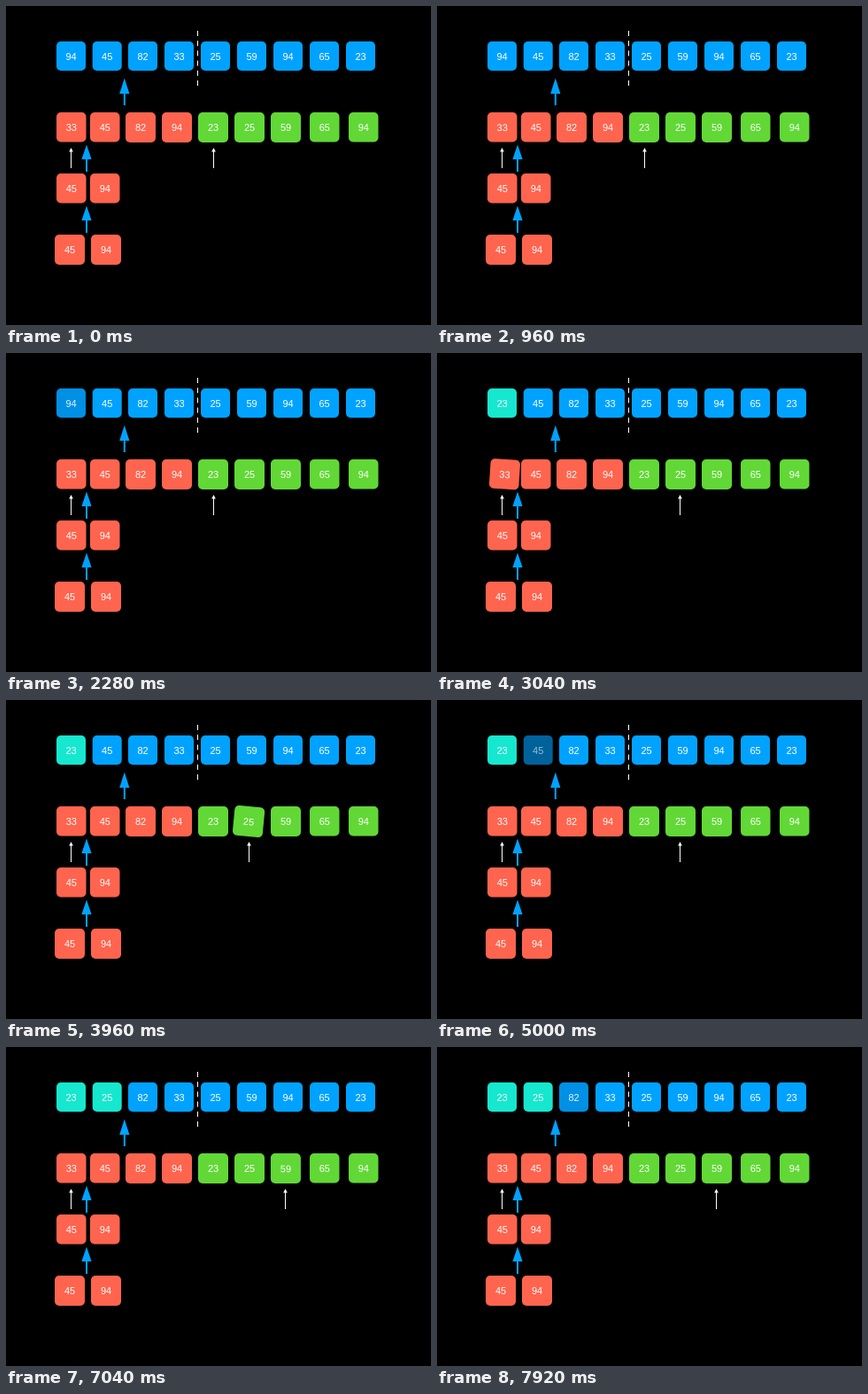
Recreate the animation shown at these times as an HTML page with a canvas. Size 480 by 360 pixels, loop 8000 ms.

```html
<!DOCTYPE html>
<html lang="en">
<head>
<meta charset="utf-8">
<title>Merge sort</title>
<style>
html, body { margin: 0; width: 100%; height: 100%; overflow: hidden; background: #000; }
canvas { display: block; width: 480px; height: 360px; }
</style>
</head>
<body>
<canvas id="stage" width="480" height="360"></canvas>
<script>
const ctx = document.getElementById('stage').getContext('2d');
const LOOP = 8000;
const BLUE = '#00a2ff', RED = '#ff644e', GREEN = '#61d836', TEAL = '#16e7cf';
const FADE_OUT = 350, FADE_IN = 300, SLIDE = 300, JIGGLE = 1000;

// Left tile wobbles, then the right one; the smaller value replaces a top tile.
const steps = [
  { jiggle: 210, fade: 2210, slide: 2560, value: 23 },
  { jiggle: 2850, fade: 4850, slide: 5500, value: 25 },
  { jiggle: 5790, fade: 7850, slide: Infinity, value: 33 }
];
const topRow = [94, 45, 82, 33, 25, 59, 94, 65, 23];
const topX = [57, 97.7, 138, 179, 220, 261, 302, 343, 384];
const reds = [[57, 33], [95, 45], [135, 82], [176, 94]];
const greens = [[217, 23], [258, 25], [299, 59], [343, 65], [387, 94]];
const pointerX = [234.5, 274.5, 315.5];

const progress = (t, start, length) => Math.min(1, Math.max(0, (t - start) / length));
const ease = p => p * p * (3 - 2 * p);

function tile(x, y, size, value, color, alpha = 1, wobble = 0) {
  ctx.save();
  ctx.globalAlpha = alpha;
  ctx.translate(x + size / 2, y + size / 2);
  if (wobble > 0 && wobble < 1) {
    ctx.translate(-2.7 * Math.sin(8 * Math.PI * wobble), 0);
    ctx.rotate(5.5 * Math.PI / 180 * Math.sin(4 * Math.PI * wobble));
  }
  ctx.fillStyle = color;
  ctx.beginPath();
  ctx.roundRect(-size / 2, -size / 2, size, size, 5);
  ctx.fill();
  ctx.fillStyle = '#fff';
  ctx.fillText(value, 0, 4.2);
  ctx.restore();
}

function arrow(x, tip, base, end, halfWidth, stem, color) {
  ctx.fillStyle = color;
  ctx.beginPath();
  ctx.moveTo(x, tip);
  ctx.lineTo(x + halfWidth, base);
  ctx.lineTo(x - halfWidth, base);
  ctx.fill();
  ctx.fillRect(x - stem / 2, base - 1, stem, end - base + 1);
}

function drawTop(t) {
  topRow.forEach((value, i) => {
    const step = steps[i];
    const out = step ? ease(progress(t, step.fade, FADE_OUT)) : 0;
    if (out < 1) tile(topX[i], 40, 33, value, BLUE, 1 - out);
    else tile(topX[i], 40, 33, step.value, TEAL,
      ease(progress(t, step.fade + FADE_OUT, FADE_IN)));
  });
  ctx.strokeStyle = '#fff';
  ctx.lineWidth = 1;
  ctx.setLineDash([6, 5.2]);
  ctx.beginPath();
  ctx.moveTo(216.5, 28);
  ctx.lineTo(216.5, 90);
  ctx.stroke();
}

function drawHalves(t) {
  const current = steps.findLast(s => t >= s.jiggle);
  const leftWobble = current ? progress(t, current.jiggle, JIGGLE) : 0;
  reds.forEach(([x, value], i) =>
    tile(x, 120, i < 2 ? 33.5 : 34, value, RED, 1, i ? 0 : leftWobble));
  greens.forEach(([x, value], i) => {
    const wobble = steps[i] ? progress(t, steps[i].jiggle + JIGGLE, JIGGLE) : 0;
    tile(x, 120, i < 3 ? 34 : 33.5, value, GREEN, 1, wobble);
  });

  let x = pointerX[0];
  for (let i = 0; i < 2; i++)
    x += (pointerX[i + 1] - pointerX[i]) * ease(progress(t, steps[i].slide, SLIDE));
  for (const px of [73.5, x]) arrow(px, 160, 164.5, 183, 2.3, 1, '#fff');
}

function drawLower() {
  tile(57, 189, 33.5, 45, RED);
  tile(95, 189, 33.5, 94, RED);
  tile(55, 258, 34, 45, RED);
  tile(96, 258, 34, 94, RED);
  arrow(133.8, 81.5, 99, 112, 5.6, 2, BLUE);
  arrow(91, 156.5, 173, 187, 5.6, 2, BLUE);
  arrow(91, 225.5, 242, 256, 5.6, 2, BLUE);
}

function frame() {
  const t = performance.now() % LOOP;
  ctx.fillStyle = '#000';
  ctx.fillRect(0, 0, 480, 360);
  ctx.font = '11px "Liberation Sans", Arial, sans-serif';
  ctx.textAlign = 'center';
  drawTop(t);
  drawHalves(t);
  drawLower();
  requestAnimationFrame(frame);
}
frame();
</script>
</body>
</html>
```
